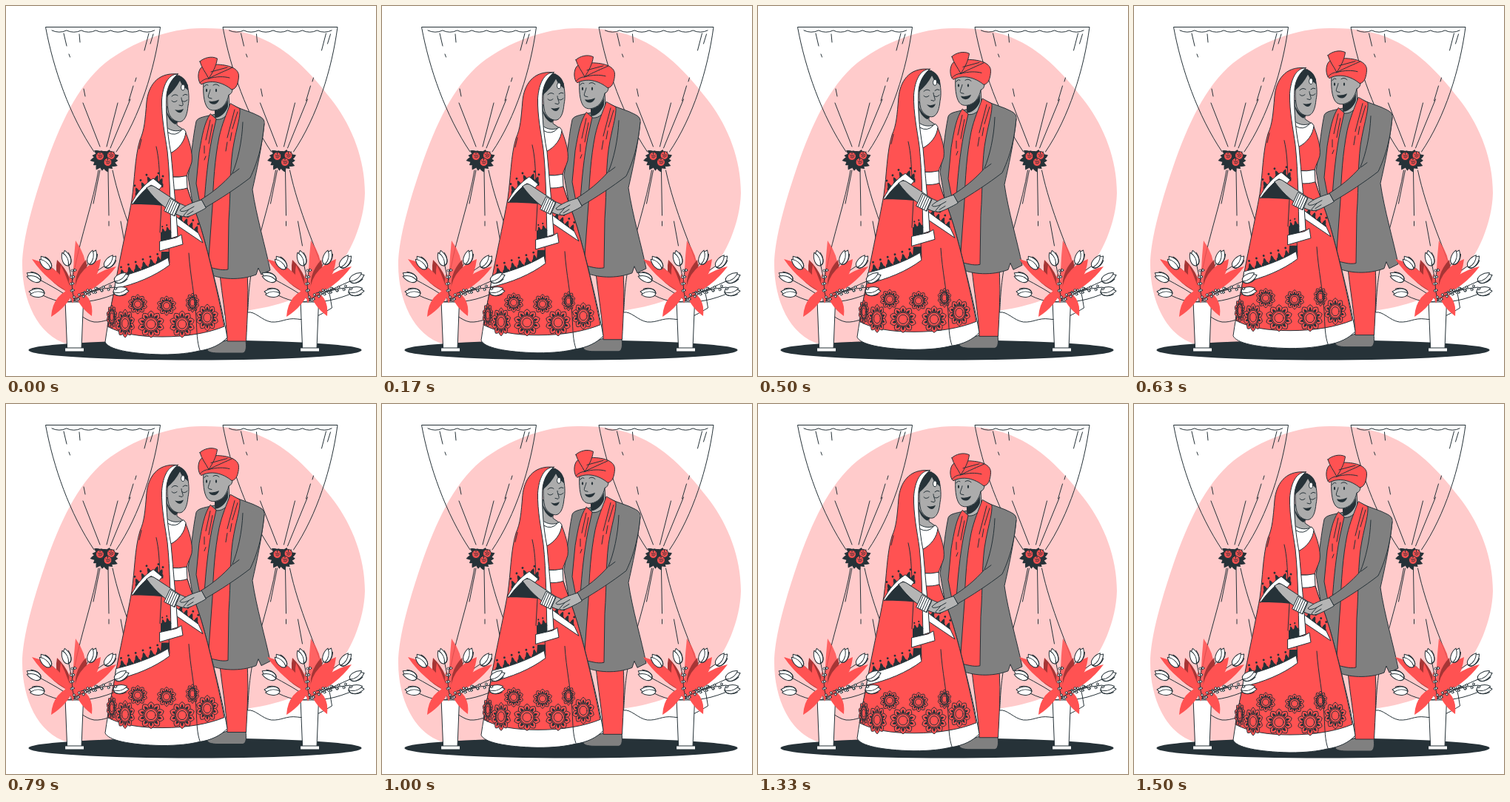
Animation, 500 px wide and 500 px high, one loop 1.54 s. Source, as an HTML page:

```html
<!DOCTYPE html>
<html lang="en">
<head>
<meta charset="utf-8">
<title>Wedding couple</title>
<style>
html, body { margin: 0; width: 100%; height: 100%; overflow: hidden; background: #fff; }
svg { display: block; width: 100%; height: 100%; stroke-linecap: round; stroke-linejoin: round; }
.w, .r, .g, .s, .b, .l { stroke: #263238; stroke-width: 1; }
.w { fill: #fff; }
.r { fill: #ff5252; }
.g { fill: #808080; }
.s { fill: #b5b5b5; }
.b { fill: #acacac; }
.l { fill: none; }
.d { fill: #263238; }
</style>
</head>
<body>
<svg viewBox="0 0 500 500">
<defs>
  <g id="curtain">
    <path class="l" d="M125 222C118 264 101 312 93 354C88 382 88 402 87 414C97 412 106 425 119 427C133 428 139 421 154 423C173 426 187 416 201 408C196 370 181 336 169 304C158 274 150 250 144 222"/>
    <path class="l" d="M119 197C86 148 64 85 53.500 28.500H208.500C201 85 181 150 149 197"/>
    <path class="l" id="scallop"/>
    <path class="l" d="M78 37L82 54M85 65L86.500 69M99 38L100 49M193 37L187 60M199 38L195 51M176 97L174.500 102M172 108L166 128M105 112L107 122M104 131L127 190M151 131L136 190M168 126L141 192M127 222L118 267M138 222L139 283M139 291V297M155 291L161 324"/>
    <g id="posy"></g>
  </g>
  <g id="bouquet"></g>
</defs>

<path fill="#ffcbcb" d="M268 30C223 29 171 48 134 77C96 108 72 163 54 214C39 258 22 313 22 350C22 396 42 446 84 457C137 465 248 424 330 411C374 404 411 391 438 365C466 338 484 291 485 253C485 207 468 165 444 132C416 95 387 63 350 46C326 34 299 30 268 30Z"/>
<use href="#curtain"/>
<use href="#curtain" x="239.500"/>
<ellipse class="d" cx="255.500" cy="465" rx="225" ry="13.500"/>

<g id="couple">
  <!-- groom -->
  <path class="g" d="M300 451C291 455 277 456 272 462C271 467 276 469 288 469H320C325 468 325 460 324 452Z"/>
  <path class="r" d="M289 362C292 392 298 424 299 453H324.500C326 423 328 392 326 362Z"/>
  <path class="g" d="M284 146C271 149 259 150 257 156C252 180 250 209 246 231C252 266 262 322 272 361C289 370 317 371 338 363L341 354L345 363L357 357C351 327 338 283 333 248C338 226 346 190 349 159C350 151 342 149 334 145L307 135Z"/>
  <path class="s" d="M282 133L283 153C291 155 299 149 302 141L301 119Z"/>
  <path class="d" d="M282 141C290 141 297 134 300 126L300 136C297 144 290 151 283 151Z"/>
  <path class="r" d="M276 146C268 157 265 175 261 198L257 240L262 266H268C270 235 273 207 278 180L284 153Z"/>
  <path class="r" d="M303 132C298 146 292 159 288 177C282 207 280 240 279 270L273 353C282 354 290 358 300 356L301 290C304 250 302 214 308 185C312 164 317 149 316 139Z"/>
  <path class="l" d="M276 154L270 181M279 160L274 186M268 189V199M270 203L268 208M309 140L299 178M313 143L306 166M299 184L297 196M305 171L303 182M340 166L333 192"/>
  <path class="b" d="M267 101C266 116 267 130 272 137C277 144 288 141 294 135C298 130 300 125 301 120C307 119 308 107 302 106L294 97Z"/>
  <path class="l" d="M268 109Q270 105 273 107M280 107Q284 104 288 108M276 113C275 118 272 122 274 124L278 125"/>
  <ellipse class="d" cx="271" cy="114" rx="1.100" ry="2.200"/>
  <ellipse class="d" cx="284" cy="114" rx="1.100" ry="2.200"/>
  <path class="d" d="M274 128.500Q281 130 288 126.500C286 134 277 135 274 128.500Z"/>
  <path class="r" d="M264 83C258 88 259 103 264 106C277 99 293 103 305 113C312 112 314 103 314.500 95C315 85 303 79 282 79Z"/>
  <path class="r" d="M262 75C267 70 278 67 285.500 71C284 82 279 90 274 98C270 90 264 83 262 75Z"/>
  <path class="l" d="M274 98Q267 98 262 104M274 98C285 92 298 87 306 83M274 98C285 95 294 95 302 97M277 89L299 83"/>

  <!-- bride -->
  <path class="w" d="M171 264C163 310 143 391 134 454C138 464 167 470 210 471C233 471 249 469 261 466C277 464 291 457 299 448C292 407 275 340 264 302C258 282 250 263 245 246H220Z"/>
  <path class="r" d="M171 264C163 310 147 375 137 433C156 443 180 447 211 447C244 447 273 442 295 433C287 391 275 340 264 302C258 282 250 263 245 246H220Z"/>
  <g id="rosettes"></g>
  <path class="l" d="M247 334C249 365 255 390 257 421C258 441 258 454 262 465"/>
  <path class="r" d="M218 180L242 169C247 181 253 198 251 211C249 219 245 224 244 231H224Z"/>
  <path class="w" d="M223 231Q234 232 244 229.500L245 246Q236 249 225 248Z"/>
  <g class="d" id="sash"></g>
  <path class="w" d="M229 284L260 307L266 320L229 295Z"/>
  <path class="b" d="M217 136V174C224 181 237 178 241 168L231 161V148Z"/>
  <path class="d" d="M217 142C221 151 227 156 233 156L229 160C222 157 218 150 217 142Z"/>
  <path class="w" d="M217 164C224 170 234 170 240 166L243 170C242 182 234 193 222 199Z"/>
  <path class="l" d="M219 171Q229 177 237 168"/>
  <path class="b" d="M222 104C217 116 217 133 220 145C223 153 231 158 237 156C243 153 245 145 246 135C248 126 247 116 245 106L235 97Z"/>
  <path class="d" d="M231 93C222 99 218 110 217 123C225 116 231 109 235 101C238 107 242 110 246 114C247 104 241 95 231 93Z"/>
  <path class="l" d="M234 94L238 106M224 128Q227 131.500 231 128M238 128Q241 131 245 127M224 122Q228 118 232 121M239 121Q242 118 245 120M237 124C237 129 241 133 238 135L234 134"/>
  <ellipse class="w" cx="239" cy="110" rx="2.500" ry="4"/>
  <path class="d" d="M228 140Q234 142 240 139Q236 149 228 140Z"/>

  <path class="r" d="M232 92C203 89 192 110 190 130C188 154 187 168 181 181C174 204 174 235 170 262C163 301 153 345 148 374L221 347L220 325L232 312C229 275 225 230 222 198C217 170 215 141 217 119C219 105 224 97 232 92Z"/>
  <path class="w" d="M232 92C219 92 212 107 210.500 127C210 152 215 174 218 196C222 233 222 278 223 314L232 311C230 275 226 234 223 199C217 169 216 140 217 120C219 106 225 98 232 92Z"/>
  <path class="d" d="M209 306L223 303V316L209 319ZM210 332H221V342L209 345Z"/>
  <g class="d" id="trim"></g>
  <path class="w" d="M208 318L230 313L237 309L239 322L208 331Z"/>
  <path class="w" d="M149 367C174 361 199 352 219 340L221 350C201 365 175 376 147 382Z"/>
  <path class="l" d="M203 190C207 207 207 222 208 238M183 180L180 193M210 270L208 306"/>
  <path class="d" d="M171 268C178 257 186 248 193 243L218 271C202 268 185 268 171 268Z"/>
  <path class="w" d="M170 266C177 252 187 241 199 233L211 243L207 248L196 242C187 248 179 257 171 268Z"/>
  <path class="s" d="M190 246Q196 240 202 245C212 252 225 260 235 267C242 270 250 273 253 279C250 286 242 286 234 283C219 277 203 264 190 246Z"/>
  <path class="w" d="M222 260L235 268L228 284L214 277Z"/>
  <path class="l" id="bangles"/>

  <!-- sleeve and joined hands -->
  <path fill="#808080" d="M349 159C346 192 339 213 330 232C312 246 289 261 270 272L263 262C279 252 293 241 306 226C313 209 318 187 322 166C331 150 347 148 349 159Z"/>
  <path class="l" d="M349 159C346 192 339 213 330 232C312 246 289 261 270 272L263 262C279 252 293 241 306 226C313 209 319 184 320 157M307 226L315 220"/>
  <path class="s" d="M264 262C254 265 242 269 235 276C236 279 243 277 247 275L240 283C241 287 249 284 257 280C263 277 267 275 270 273Z"/>
  <path class="l" d="M247 275L254 271M245 282L253 277"/>
</g>

<use href="#bouquet"/>
<use href="#bouquet" x="318"/>
</svg>
<script>
const RED = '#ff5252', DARK = '#263238', DEEP = '#a63535';
const $ = id => document.getElementById(id);
const n = v => v.toFixed(1);

// pointed shape from one point to another, w wide, bowed sideways by b
function leaf(x, y, tx, ty, w, b, fill, extra = '') {
  const dx = tx - x, dy = ty - y, len = Math.hypot(dx, dy);
  const side = k => `${n(x + dx * .5 - dy / len * k)} ${n(y + dy * .5 + dx / len * k)}`;
  return `<path fill="${fill}" ${extra} d="M${x} ${y}Q${side(b + w)} ${tx} ${ty}Q${side(b - w)} ${x} ${y}Z"/>`;
}

function tulip(x, y, deg) {
  return `<g transform="translate(${x} ${y}) rotate(${deg})">
    <path class="w" d="M0 10C-7 9 -7 -3 0 -11C7 -3 7 9 0 10Z"/>
    <path class="w" d="M0 10C-7 10 -8 -2 -4 -9C0 -5 3 2 0 10Z"/>
    <path class="l" d="M0 10C6 8 7 0 4 -7"/></g>`;
}

function berries(x, y, cx, cy, tx, ty, count) {
  let s = `<path class="l" d="M${x} ${y}Q${cx} ${cy} ${tx} ${ty}"/>`;
  for (let i = 1; i <= count; i++) {
    const t = i / count, u = 1 - t, side = i % 2 ? 2 : -2;
    const px = u * u * x + 2 * u * t * cx + t * t * tx;
    const py = u * u * y + 2 * u * t * cy + t * t * ty;
    s += `<circle class="w" cx="${n(px + side * .6)}" cy="${n(py + side)}" r="1.500"/>`;
  }
  return s;
}

function bouquet() {
  const buds = [[54, 347, -38], [38, 366, -62], [42, 387, -84], [82, 341, -14],
                [117, 340, 24], [141, 346, 44], [156, 368, 66], [155, 386, 86]];
  let s = '';
  for (const [x, y] of buds)
    s += `<path class="l" d="M92 398Q${n(92 + (x - 92) * .35)} ${n(y + 18)} ${x} ${y}"/>`;
  s += leaf(91, 396, 94, 317, 17, 14, RED, 'opacity=".85"')
    + leaf(90, 393, 69, 343, 15, -3, DEEP)
    + leaf(87, 388, 50, 356, 12, 4, DEEP)
    + leaf(95, 390, 108, 343, 13, 0, DEEP)
    + leaf(90, 389, 35, 342, 14, 4, RED)
    + leaf(92, 396, 128, 342, 20, -3, RED)
    + leaf(95, 393, 149, 352, 13, -3, RED)
    + leaf(90, 397, 74, 350, 9, -5, RED);
  for (const b of buds) s += tulip(...b);
  s += '<path class="w" d="M80.500 400H104.500L102 463H83Z"/><path class="w" d="M80 462H105.500V467H80Z"/>'
    + leaf(94, 380, 61, 420, 14, 5, RED)
    + leaf(89, 386, 67, 410, 10, 2, RED)
    + leaf(91, 381, 116, 419, 14, -5, RED)
    + leaf(90, 402, 86, 362, 8, 3, RED)
    + berries(92, 396, 86, 375, 92, 355, 9)
    + berries(93, 396, 115, 383, 147, 380, 13)
    + berries(101, 388, 114, 386, 128, 382, 5);
  return s;
}

function posy() {
  let s = '';
  for (let i = 0; i < 15; i++) {
    const a = i / 15 * Math.PI * 2 - Math.PI / 2;
    const k = (i % 2 ? 1 : .9) * (1 - .35 * Math.max(0, -Math.sin(a)) ** 6);
    s += leaf(133.5, 207, n(133.5 + 20 * k * Math.cos(a)), n(207 + 18 * k * Math.sin(a)), 8, 2, DARK);
  }
  s += `<ellipse class="d" cx="133.500" cy="207" rx="15" ry="11"/>`;
  for (const [x, y] of [[127, 203], [142, 202], [137.5, 211]])
    s += `<circle class="r" cx="${x}" cy="${y}" r="5.500"/>
      <path class="l" d="M${x - 3} ${y - 2}q3 4 6 0m-5 3q3 3 5-1m-3-5v3"/>`;
  return s;
}

function rosette(x, y, rx, ry) {
  const ring = (cls, count, k, w) => {
    let s = '';
    for (let i = 0; i < count; i++)
      s += `<path class="${cls}" transform="rotate(${n(i * 360 / count)})" d="M0 -.45C${-w} -.6 ${-w} -${k - .18} 0 -${k}C${w} -${k - .18} ${w} -.6 0 -.45Z" vector-effect="non-scaling-stroke"/>`;
    return s;
  };
  const dot = r => `<circle class="r" r="${r}" vector-effect="non-scaling-stroke"/>`;
  return `<g transform="translate(${x} ${y}) scale(${rx} ${ry})">${ring('r', 10, 1, .32)}${ring('d', 10, .84, .13)}${dot(.58)}${dot(.5)}${dot(.34)}</g>`;
}

// row of small spades with a dot above each
function spades(x1, y1, x2, y2, count, h) {
  const deg = Math.atan2(y2 - y1, x2 - x1) * 180 / Math.PI;
  let s = '';
  for (let i = 0; i < count; i++) {
    const t = (i + .5) / count;
    s += `<g transform="translate(${n(x1 + (x2 - x1) * t)} ${n(y1 + (y2 - y1) * t)}) rotate(${n(deg * .6)}) scale(${h / 10})">
      <path d="M-6 3Q-5 -3 -3 -3Q-2 -8 0 -10Q2 -8 3 -3Q5 -3 6 3Z"/><circle cy="-13" r="1.600"/></g>`;
  }
  return s;
}

$('scallop').setAttribute('d', 'M62 33' + 'q9.900 4.500 19.800 0'.repeat(7));
$('posy').innerHTML = posy();
$('bouquet').innerHTML = bouquet();
$('rosettes').innerHTML = [[143, 420, 7, 16], [178, 403, 13, 13], [217, 405, 13, 13], [252, 401, 9, 13],
  [161, 429, 13, 19], [196, 430, 18, 18], [238, 430, 17, 18], [272, 421, 15, 18]]
  .map(r => rosette(...r)).join('');
$('trim').innerHTML = spades(153, 366, 212, 345, 6, 9) + spades(175, 257, 199, 235, 3, 9)
  + spades(199, 235, 211, 243, 2, 9) + spades(210, 308, 222, 304, 2, 7);
$('sash').innerHTML = spades(231, 288, 259, 308, 4, 9);
$('bangles').setAttribute('d', [0, 1, 2, 3, 4].map(i =>
  `M${n(216 + i * 2.8)} ${n(278 + i * 1.4)}l7 -16`).join(''));

// rise and sink at an even pace, stepped at 24 pictures a second
const LOOP = 1540, SWING = 1500, RISE = 10, FPS = 24;
const couple = $('couple');
const start = performance.now();

function draw(ms) {
  const t = Math.floor((ms % LOOP + 5) * FPS / 1000) * 1000 / FPS;
  const p = Math.min(t, SWING) / SWING;
  const y = -RISE * (1 - Math.abs(1 - 2 * p));
  couple.setAttribute('transform', `translate(0 ${y.toFixed(3)})`);
}

function tick() {
  draw(performance.now() - start);
  requestAnimationFrame(tick);
}
tick();
</script>
</body>
</html>
```
